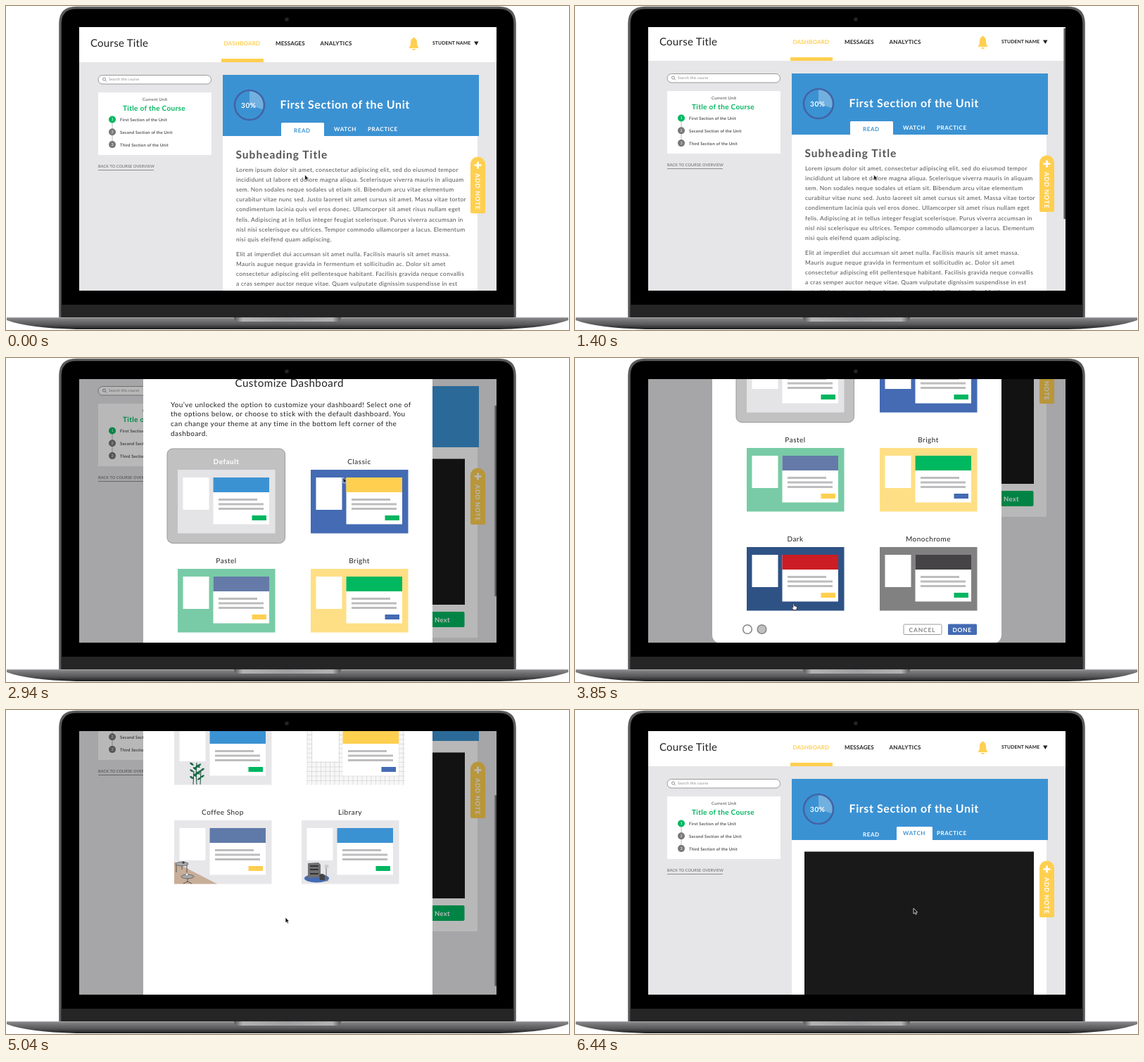
An HTML page that plays this animation: 800 by 461 pixels, repeating every 6510 ms.

```html
<!DOCTYPE html>
<html lang="en">
<head>
<meta charset="utf-8">
<title>Course dashboard</title>
<style>
  html, body { margin: 0; width: 100%; height: 100%; overflow: hidden; background: #fff; }
  svg { display: block; width: 800px; height: 461px; }
  text { font-family: Lato, "Open Sans", sans-serif; text-rendering: geometricPrecision; }
</style>
</head>
<body>
<svg id="stage" viewBox="0 0 800 461"></svg>
<script>
const BLUE = '#3b92d3', NAVY = '#446bb3', GREEN = '#00b660', YELLOW = '#ffcf50', GREY = '#e6e5e7', INK = '#222';
const LOOP = 6510, STEP = 70;

// Drawing helpers; text y is the middle of the capitals
const rect = (x, y, w, h, fill, r = 0, extra = '') =>
  `<rect x="${x}" y="${y}" width="${w}" height="${h}" rx="${r}" fill="${fill}" ${extra}/>`;
const circle = (x, y, r, fill, extra = '') => `<circle cx="${x}" cy="${y}" r="${r}" fill="${fill}" ${extra}/>`;
const path = (d, fill, extra = '') => `<path d="${d}" fill="${fill}" ${extra}/>`;
const line = (d, stroke, width = 1) => path(d, 'none', `stroke="${stroke}" stroke-width="${width}"`);
const text = (x, y, s, size, gap, fill, extra = '') =>
  `<text x="${x}" y="${y + size * .36}" font-size="${size}" letter-spacing="${gap}" fill="${fill}" ${extra}>${s}</text>`;
const BOLD = 'font-weight="700"', MID = 'text-anchor="middle"';
const group = (id, body) => `<g id="${id}">${body}</g>`;

const paragraphs = [
  [233, `Lorem ipsum dolor sit amet, consectetur adipiscing elit, sed do eiusmod tempor
incididunt ut labore et dolore magna aliqua. Scelerisque viverra mauris in aliquam
sem. Non sodales neque sodales ut etiam sit. Bibendum arcu vitae elementum
curabitur vitae nunc sed. Justo laoreet sit amet cursus sit amet. Massa vitae tortor
condimentum lacinia quis vel eros donec. Ullamcorper sit amet risus nullam eget
felis. Adipiscing at in tellus integer feugiat scelerisque. Purus viverra accumsan in
nisl nisi scelerisque eu ultrices. Tempor commodo ullamcorper a lacus. Elementum
nisi quis eleifend quam adipiscing.`],
  [353, `Elit at imperdiet dui accumsan sit amet nulla. Facilisis mauris sit amet massa.
Mauris augue neque gravida in fermentum et sollicitudin ac. Dolor sit amet
consectetur adipiscing elit pellentesque habitant. Facilisis gravida neque convallis
a cras semper auctor neque vitae. Quam vulputate dignissim suspendisse in est
ante. Volutpat commodo sed egestas egestas fringilla phasellus. Mattis
pellentesque id nibh tortor id aliquet lectus proin nibh. Sed risus ultricies tristique
nulla aliquet enim tortor at auctor. Lectus vestibulum mattis ullamcorper velit
sed. Ac tincidunt vitae semper quis lectus nulla at volutpat diam.`],
  [473, `Pellentesque diam volutpat commodo sed egestas egestas. Ipsum faucibus vitae
aliquet nec ullamcorper sit amet risus. Ultrices sagittis orci a scelerisque purus
semper eget duis at. Vulputate ut pharetra sit amet aliquam id. Pulvinar sapien et
ligula ullamcorper malesuada proin libero. Vitae justo eget magna fermentum
iaculis eu non diam. Mi proin sed libero enim. Neque vitae tempus quam
pellentesque nec nam. Iaculis at erat pellentesque adipiscing commodo. Lacinia
at quis risus sed vulputate odio ut enim. Phasellus faucibus scelerisque eleifend
donec pretium.`]
];
const textLines = (x, y, gap, s, size, space, fill) =>
  s.split('\n').map((row, i) => text(x, y + i * gap, row, size, space, fill)).join('');
const nextButton = y => rect(590, y, 61.5, 22, GREEN, 2) + text(609, y + 11.5, 'Next', 9.5, .3, '#fff', BOLD);

const header =
  rect(104, 20, 593, 60, '#fff') +
  text(120, 53, 'Course Title', 15, .25, INK) +
  text(309.5, 53, 'DASHBOARD', 8, .15, YELLOW, BOLD) +
  text(383, 53, 'MESSAGES', 8, .1, INK, BOLD) +
  text(446.5, 53, 'ANALYTICS', 8, .28, INK, BOLD) +
  text(606, 53, 'STUDENT NAME', 6.8, .1, INK, BOLD) +
  path('M665 50.5h6.5l-3.2 5.5z', INK) +
  rect(306, 75, 60, 5, YELLOW) +
  path('M572 60q3-2 3-8q0-5 3-6a1.5 1.5 0 0 1 3 0q3 1 3 6q0 6 3 8zM577 61h5a2.5 2 0 0 1-5 0z', YELLOW);

const units = ['First', 'Second', 'Third'].map((name, i) => {
  const y = 161.5 + i * 17.8;
  return circle(151, y, 5, i ? '#777' : GREEN) + text(151, y, i + 1, 5.5, 0, '#fff', MID) +
    text(162, y + .5, name + ' Section of the Unit', 6, .16, INK);
}).join('');

const sidebar =
  rect(131, 98.5, 160.5, 12.5, '#fff', 6.2, 'stroke="#999"') +
  circle(139.5, 104, 2, 'none', 'stroke="#777" stroke-width=".8"') + line('M141 105.5l2 2', '#777', .8) +
  text(146, 104.5, 'Search this course', 5.2, .12, '#888') +
  rect(131, 123, 161, 89, '#fff') +
  text(194, 133, 'Current Unit', 6, .2, '#444') +
  text(166, 145, 'Title of the Course', 10, .35, GREEN, BOLD) +
  line('M151 162V197', '#bbb') + units +
  text(131, 228, 'BACK TO COURSE OVERVIEW', 5.6, .1, '#666') + line('M131 233.5H210', '#777', .8);

const banner =
  rect(308, 98, 364, 87, BLUE) +
  path('M346 141V120A21 21 0 0 1 366 147.500z', '#fff', 'opacity=".28"') +
  circle(346, 141, 21, 'none', 'stroke="#4264a6" stroke-width="2.6"') +
  text(334, 141, '30%', 10, .6, '#fff', BOLD) +
  text(389.5, 140.5, 'First Section of the Unit', 16, .6, '#fff', BOLD);

const tabs = active => ['READ', 'WATCH', 'PRACTICE'].map((name, i) => {
  const on = i === active, x = [409, 466, 514][i];
  return (on ? rect([391, 457][i], 166, [61, 51][i], 20, '#fff', 1.5) : '') +
    text(x, i ? 175 : 177, name, 8, .6, on ? BLUE : '#fff', BOLD);
}).join('');

const note =
  path('M660 225a10.500 10.500 0 0 1 21 0V293a2 2 0 0 1-2 2H662a2 2 0 0 1-2-2z', YELLOW) +
  line('M665.500 226.500h10M670.500 221.500v10', '#fff', 2.6) +
  `<g transform="translate(670.500 238) rotate(90)">${text(0, 0, 'ADD NOTE', 9, .7, '#fff', BOLD)}</g>`;

const readPage = rect(308, 185, 362, 460, '#fff') + tabs(0) +
  text(326.5, 211.5, 'Subheading Title', 15.5, 1, '#555', BOLD) +
  paragraphs.map(([y, s]) => textLines(327, y, 14.1, s, 8.4, .34, '#505050')).join('') + nextButton(592);
const watchPage = rect(308, 185, 362, 271, '#fff') + tabs(1) +
  rect(326, 201.5, 326, 207.5, '#191919') + nextButton(419);

// Theme preview: label above a small page mock-up, with optional scenery behind
const theme = (x, y, name, bg, head, button, color = INK, extra = '', scenery = '') =>
  text(x + 69, y - 12, name, 10, .5, color, MID + ' ' + extra) +
  rect(x, y, 138.5, 90.5, bg) + scenery +
  rect(x + 7.5, y + 11, 37, 46, '#fff') + rect(x + 50.5, y + 11, 79.5, 66.5, '#fff') +
  rect(x + 50.5, y + 11, 79.5, 21, head) +
  [[41, 55], [47.5, 64], [54, 64]].map(([dy, w]) => rect(x + 58, y + dy, w, 3, '#bdbcbe')).join('') +
  rect(x + 105.5, y + 65, 20.5, 7, button);

const footer = active =>
  [0, 1].map(i => circle(245 + i * 20.5, 616, 6.3, i === active ? '#fff' : '#c0c0c0', 'stroke="#888" stroke-width="1.6"')).join('') +
  rect(467, 609, 54, 14.5, '#fff', 1.5, 'stroke="#999"') + text(474.5, 616.5, 'CANCEL', 8.5, .8, '#888', BOLD) +
  rect(530, 608.5, 41, 15.5, NAVY, 1.5) + text(536.5, 616.5, 'DONE', 8.5, .6, '#fff', BOLD);

const themes =
  textLines(234, 124, 13.8, `You’ve unlocked the option to customize your dashboard! Select one of
the options below, or choose to stick with the default dashboard. You
can change your theme at any time in the bottom left corner of the
dashboard.`, 10, .45, INK) +
  rect(229, 187, 167.5, 134.5, '#c1c1c1', 8, 'stroke="#999"') +
  theme(244, 217, 'Default', '#e4e3e6', BLUE, GREEN, '#fff', BOLD) +
  theme(433, 217, 'Classic', NAVY, YELLOW, GREEN) +
  theme(244, 358, 'Pastel', '#78cba6', '#657aa8', YELLOW) +
  theme(433, 358, 'Bright', '#ffdf85', '#00b85f', NAVY) +
  theme(244, 499, 'Dark', '#2f5285', '#cc1d24', YELLOW) +
  theme(433, 499, 'Monochrome', '#818181', '#454345', GREEN) + footer(0);

let leaves = line('M271 247Q269 232 271 216M266 247L267 228M276 247L277 226', '#164b35', 1);
for (let i = 0; i < 14; i++) {
  const side = i % 2 ? 1 : -1, x = 267 + (i % 3) * 4.5, y = 220 + i * 1.6;
  leaves += path(`M${x} ${y}q${side * 2}-5 ${side * 6}-4q${-side} 4 ${-side * 6} 4z`, '#176b47');
}
let grid = '';
for (let i = 0; i <= 138; i += 6.5) grid += `M${428 + i} 157v90.500`;
for (let i = 0; i <= 90; i += 6.5) grid += `M428 ${157 + i}h138.500`;
const table = (x, y, r) => `<ellipse cx="${x}" cy="${y}" rx="${r}" ry="2.800" fill="#aaa" stroke="#555" stroke-width=".8"/>`;

const coffee = path('M239 357L300 388.500H239z', '#c8ae98') +
  line('M242 361v11M257 361v11M250 361v7M258 378v8M252 388l6-3l6 3', '#555', 1) +
  table(250, 360, 9) + table(258, 378, 9) + circle(252, 358, 1.8, '#444') + circle(257, 375, 2, '#eee', 'stroke="#666" stroke-width=".6"');
const library = `<ellipse cx="441.500" cy="380.500" rx="17.500" ry="6" fill="${NAVY}"/>` +
  path('M429 359l15-1l3 3v18l-18 1z', '#707072') + line('M432 363h12M432 368h12M432 374h12', '#333', 1.8) +
  path('M445 376q4-4 8 0v7h-7z', '#444') + line('M455 363v20M452 384h6', '#777') + path('M452 365l1.500-4h4l1.500 4z', '#ccc');

const scenes =
  theme(239, 157, 'Plants', '#e7e6e9', BLUE, GREEN) + leaves +
  theme(428, 157, 'Grid', '#f7f7f7', YELLOW, NAVY, INK, '', line(grid, '#d3d3d5', .7)) +
  theme(239, 298, 'Coffee Shop', '#e7e6e9', '#5f7aa8', YELLOW) + coffee +
  theme(420, 298, 'Library', '#e7e6e9', BLUE, GREEN) + library + footer(1);

const modal = rect(195, 60, 411, 576, '#fff', 12) + text(325.5, 93.5, 'Customize Dashboard', 15.2, .43, INK) +
  group('themes', themes) + group('scenes', scenes);

const stops = list => list.map(([at, c]) => `<stop offset="${at}" stop-color="${c}"/>`).join('');
const laptop =
  path('M77 443V25Q77 2.500 99.500 2.500H700.500Q723 2.500 723 25V443z', '#000', 'stroke="#5a5a5d" stroke-width="3.500"') +
  rect(78.5, 425, 643, 18, '#252526') +
  circle(399, 19, 3, '#1c1c20') + circle(399, 19, 1.2, '#30303a') +
  path('M1 443H799V447Q770 458 700 460H100Q30 458 1 447z', 'url(#metal)') +
  path('M324 443H476Q476 449 468 449H332Q324 449 324 443z', 'url(#notch)');

document.getElementById('stage').innerHTML =
  `<defs><clipPath id="screen">${rect(104, 30, 593, 375, '#000')}</clipPath>
  <linearGradient id="metal" x2="0" y2="1">${stops([[0, '#b0b0b2'], [.1, '#838386'], [.35, '#6c6c6f'], [.6, '#58585b'], [.8, '#39393b'], [1, '#1c1c1e']])}</linearGradient>
  <linearGradient id="notch">${stops([[0, '#555'], [.08, '#b2b2b4'], [.5, '#a0a0a2'], [.92, '#b2b2b4'], [1, '#555']])}</linearGradient></defs>` +
  laptop + `<g clip-path="url(#screen)">` + rect(104, 30, 593, 375, GREY) +
  group('page', header + sidebar + banner + group('read', readPage) + group('watch', watchPage) + note) +
  group('dialog', rect(104, 30, 593, 375, '#000', 0, 'opacity=".28"') + group('modal', modal)) +
  rect(694.4, 30, 2.6, 272, '#58585b', 1.3, 'id="bar"') +
  group('arrow', path('M0 0V8L1.900 6.400L3.200 9L4.500 8.300L3.300 5.800H5.600z', '#111', 'stroke="#fff" stroke-width=".7"')) +
  group('hand', path('M0 0q1.300-.6 1.600 .8V3l3.400 1q.8 .4 .6 2l-.8 3h-4L-1.700 5.800q0-1 1.100-.5L0 5.600z', '#fff', 'stroke="#222" stroke-width=".8"')) +
  '</g>';

// Keys are [time, ...values]; each stretch eases in and out
const scrollKeys = [[230, 0], [700, 225], [970, 225], [1425, 0], [2740, 0], [3350, 230], [4830, 230], [5325, 0]];
const cursorKeys = [[1470, 424.5, 240], [1740, 479, 170], [3500, 479, 170], [3990, 268, 394],
  [4250, 268, 394], [4600, 397, 295], [5450, 397, 295], [5850, 481, 282]];

function track(keys, t) {
  const i = keys.findIndex(key => key[0] > t);
  if (i === 0) return keys[0].slice(1);
  if (i < 0) return keys[keys.length - 1].slice(1);
  const a = keys[i - 1], b = keys[i], p = (t - a[0]) / (b[0] - a[0]), e = p * p * (3 - 2 * p);
  return a.slice(1).map((v, k) => v + (b[k + 1] - v) * e);
}
const within = (t, ...spans) => spans.some(([from, to]) => t >= from && t < to);
const el = id => document.getElementById(id);
const show = (id, on) => el(id).setAttribute('display', on ? 'inline' : 'none');
const move = (id, x, y) => el(id).setAttribute('transform', `translate(${x} ${y})`);

function draw(now) {
  const t = Math.floor(now % LOOP / STEP) * STEP;
  const scroll = Math.round(track(scrollKeys, t)[0]), [x, y] = track(cursorKeys, t);
  const watching = t >= 1820, second = t >= 4060;
  const pointing = within(t, [1650, 2240], [3640, 4400]);
  move('page', 0, -scroll);
  move('modal', 0, -scroll);
  move('bar', 0, scroll / 1.55);
  show('read', !watching);
  show('watch', watching);
  show('dialog', within(t, [2240, 5930]));
  show('themes', !second);
  show('scenes', second);
  show('bar', within(t, [230, 1750], [2740, 3700], [4830, 5700]));
  show('arrow', !pointing);
  show('hand', pointing);
  move('arrow', x, y);
  move('hand', x, y);
}
const start = performance.now();
function tick() {
  draw(performance.now() - start);
  requestAnimationFrame(tick);
}
tick();
</script>
</body>
</html>
```
